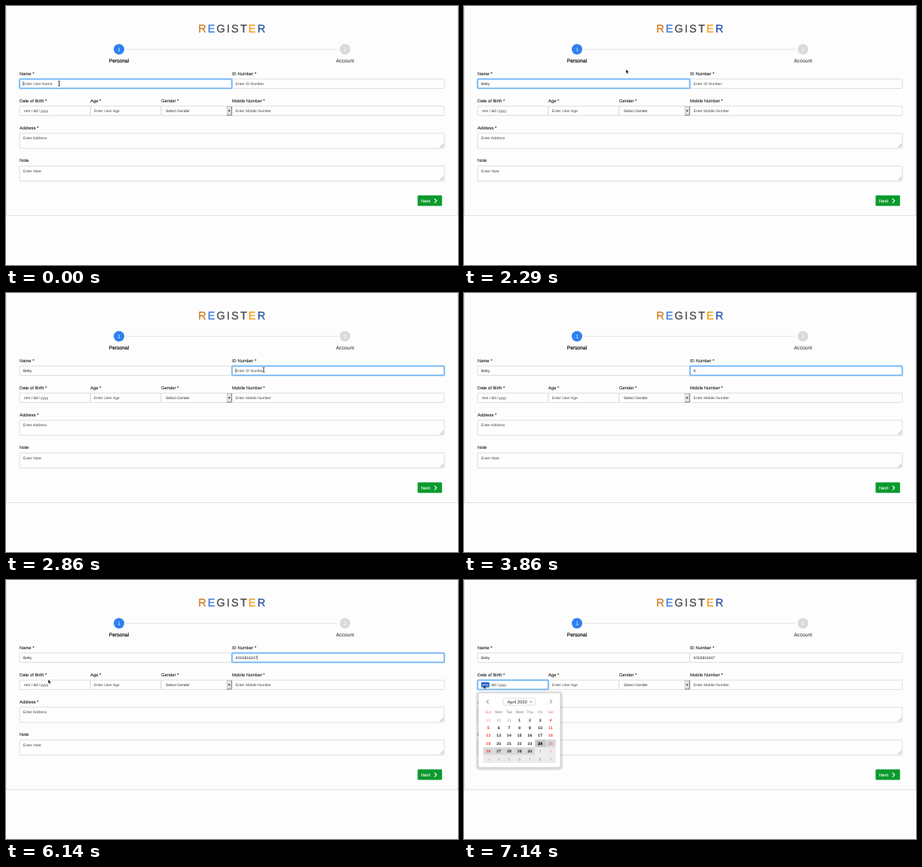
Write an HTML page that moves like this. It is 600 px wide and 344 px high and loops after 8 s.

```html
<!DOCTYPE html>
<html lang="en">
<head>
<meta charset="utf-8">
<title>Register form</title>
<style>
  html, body { margin: 0; width: 100%; height: 100%; overflow: hidden; background: #fefefe; }
  svg { display: block; width: 100vw; height: 100vh; font-family: "Liberation Sans", Arial, sans-serif; }
  text { white-space: pre; text-rendering: geometricPrecision; }
</style>
</head>
<body>
<svg id="stage" viewBox="0 0 600 344"></svg>
<script>
const LOOP = 8000, STEP = 1000 / 7;
const stage = document.getElementById('stage');

function add(tag, attrs, parent = stage) {
  const el = document.createElementNS('http://www.w3.org/2000/svg', tag);
  for (const k in attrs) el.setAttribute(k, attrs[k]);
  parent.appendChild(el);
  return el;
}
function text(str, x, y, size, fill, extra = {}, parent = stage) {
  const el = add('text', { x, y, 'font-size': size, fill, ...extra }, parent);
  el.textContent = str;
  return el;
}
function rect(x, y, width, height, fill, extra = {}, parent = stage) {
  return add('rect', { x, y, width, height, fill, ...extra }, parent);
}
function line(d, stroke, width, parent = stage) {
  return add('path', { d, stroke, 'stroke-width': width, fill: 'none' }, parent);
}
const show = (el, on) => el.setAttribute('opacity', +on);
const mid = { 'text-anchor': 'middle' };
const label = (str, x, y) => text(str, x, y, 5.85, '#222', { stroke: '#222', 'stroke-width': 0.1 });
const value = (str, x, y, fill = '#484848') => text(str, x, y, 5, fill);
const box = (x, y, w, h) => rect(x, y, w, h, '#fefefe', { stroke: '#cdcfd2', 'stroke-width': 0.7, rx: 1 });

// Page and heading
rect(0.5, -0.5, 599, 279, '#fdfdfd', { stroke: '#dedede', 'stroke-width': 0.9 });
const title = text('', 255.2, 35, 14.6, '#444', { 'letter-spacing': 2.05 });
const hues = ['#d17a1e', '#3a7fe0', '#4a4a4a', '#4a4a4a', '#4a4a4a', '#4a4a4a', '#f0a01e', '#2b55a8'];
[...'REGISTER'].forEach((c, i) => {
  add('tspan', { fill: hues[i], stroke: hues[i], 'stroke-width': 0.3 }, title).textContent = c;
});

// Step bar
line('M160 57.5H440', '#dcdcdc', 0.7);
[[150, '1', '#2f80f2', 'Personal', '#111', 0.2], [450, '2', '#dadada', 'Account', '#444', 0.08]]
  .forEach(([x, n, fill, name, ink, weight]) => {
    add('circle', { cx: x, cy: 57.5, r: 7, fill });
    text(n, x, 60, 6.6, '#fff', mid);
    text(name, x, 74.6, 6.7, ink, { ...mid, stroke: ink, 'stroke-width': weight });
  });

// Fields
label('Name *', 18, 91.6);
label('ID Number *', 300, 91.6);
label('Date of Birth *', 18, 127.6);
label('Age *', 112, 127.6);
label('Gender *', 206, 127.6);
label('Mobile Number *', 300, 127.6);
label('Address *', 18, 163.6);
label('Note', 18, 207);

const boxes = [[18, 97, 281.8, 12.4], [300, 97, 281.8, 12.4], [18, 133, 94, 12.4]];
boxes.forEach(b => box(...b));
box(112, 133, 94, 12.4);
box(206, 133, 94, 12.4);
box(300, 133, 281.8, 12.4);
value('Enter User Age', 116.8, 141);
value('Select Gender', 212, 141, '#333');
value('Enter Mobile Number', 304.8, 141);

rect(293.2, 133.4, 6.2, 11.6, '#e4e4e4', { stroke: '#aaa', 'stroke-width': 0.5 });
line('M293.2 145H299.4V133.4', '#666', 0.7);
add('path', { d: 'M294.8 138.5h3l-1.5 1.9z', fill: '#111' });

[[169, 'Enter Address'], [212.5, 'Enter Note']].forEach(([y, hint]) => {
  box(18, y, 563.8, 20);
  value(hint, 22.8, y + 8);
  line(`M576 ${y + 19}l5 -5M578.5 ${y + 19}l2.5 -2.5`, '#777', 0.6);
});

rect(546.4, 251.4, 32.4, 14, '#0b9a2d', { rx: 1.2 });
text('Next', 551, 260.6, 5.85, '#fff', { stroke: '#fff', 'stroke-width': 0.1 });
line('M568.8 256l2.8 2.8l-2.8 2.8', '#fff', 1.1);

// Focus rings
const rings = boxes.map(([x, y, w, h]) => {
  const g = add('g', {});
  rect(x, y, w, h, 'none', { stroke: '#a9d3fb', 'stroke-width': 2.4, rx: 1.4 }, g);
  rect(x, y, w, h, 'none', { stroke: '#62acee', 'stroke-width': 0.9, rx: 1 }, g);
  return g;
});

// Editable text, date parts and caret
const inputs = [
  { el: value('', 22.8, 105), hint: 'Enter User Name', full: 'Betty', x: 22.8 },
  { el: value('', 304.8, 105), hint: 'Enter ID Number', full: 'K502816347', x: 304.8 }
];
const picked = rect(22.9, 135.8, 10.6, 6.8, '#1c60cf');
const month = value('mm', 24, 141, '#333');
[['/', 33.8], ['dd', 36.6], ['/', 43.2], ['yyyy', 46]].forEach(([s, x]) => value(s, x, 141, '#333'));
const caret = rect(0, 100.2, 0.5, 6, '#222');

// Calendar
const cal = add('g', {});
for (let i = 4; i > 0; i--) {
  rect(19 - i, 151 - i, 109 + 2 * i, 98.5 + 2 * i, '#000', { opacity: 0.045, rx: 2 + i }, cal);
}
rect(19, 150, 109, 99, '#fff', { rx: 2, stroke: '#c4c4c4', 'stroke-width': 0.6 }, cal);
line('M32.6 159l-2.5 2.6l2.5 2.6M114.2 159l2.5 2.6l-2.5 2.6', '#444', 0.8, cal);
rect(52, 157, 43, 9.2, '#fff', { rx: 1, stroke: '#ccc', 'stroke-width': 0.6 }, cal);
text('April 2020', 57.5, 163.7, 5.8, '#222', {}, cal);
line('M87.2 160.8l1.8 1.8l1.8 -1.8', '#444', 0.7, cal);
const colX = c => 32.4 + 13.75 * c;
['Sun', 'Mon', 'Tue', 'Wed', 'Thu', 'Fri', 'Sat'].forEach((d, c) => {
  text(d, colX(c), 177, 5, c % 6 ? '#777' : '#f27878', mid, cal);
});
for (let i = 0; i < 42; i++) {
  const c = i % 7, r = (i - c) / 7, day = i - 2;
  const inside = day > 0 && day <= 30, weekend = c % 6 === 0;
  const x = colX(c), y = 185.7 + 10.42 * r;
  if (day >= 24) {
    const fill = day === 24 ? '#c9c9c9' : inside ? '#d8d8d8' : '#ececec';
    rect(x - 6.9, y - 5.2, 13.8, 10.45, fill, {}, cal);
  }
  const ink = inside ? (weekend ? '#f03c3c' : '#222') : (weekend ? '#f49a9a' : '#999');
  const shown = day < 1 ? day + 31 : day > 30 ? day - 30 : day;
  const bold = inside && day !== 25 ? { stroke: ink, 'stroke-width': day === 24 ? 0.4 : 0.18 } : {};
  text(shown, x, y + 1.8, 5, ink, { ...mid, ...bold }, cal);
}

// Pointers
const beam = add('g', {});
const beamPath = 'M-1.5 -3.2Q0 -3.2 0 -2.4Q0 -3.2 1.5 -3.2M0 -2.4V2.4M-1.5 3.2Q0 3.2 0 2.4Q0 3.2 1.5 3.2';
line(beamPath, '#fff', 1.5, beam);
line(beamPath, '#111', 0.8, beam);
const arrow = add('path', {
  d: 'M0 0V5.6L1.3 4.4L2.2 6.5L3.2 6.1L2.3 4H4z',
  fill: '#111', stroke: '#fff', 'stroke-width': 0.4
});

// [step, x, y]
const pathTo = [
  [0, 70.5, 103], [12, 70.5, 103], [14, 108, 92], [16, 215, 84], [18, 338, 98], [19, 342, 102],
  [38, 342, 102], [40, 262, 113], [42, 90, 128], [43, 56, 132], [46, 26, 139], [56, 26, 139]
];
function pointerAt(s) {
  const i = pathTo.findIndex(k => k[0] > s);
  const [a, b] = [pathTo[i - 1], pathTo[i]];
  const u = (s - a[0]) / (b[0] - a[0]);
  return [a[1] + (b[1] - a[1]) * u, a[2] + (b[2] - a[2]) * u];
}
const keys = [[5, 7, 9, 10, 11], [27, 31, 32, 32, 33, 34, 34, 35, 35, 36]];
const ramp = (s, start) => Math.max(0, Math.min(1, (s - start + 1) / 2));
const within = (s, a, b) => s >= a && s < b;

function draw(ms) {
  // The screen refreshes seven times a second
  const s = Math.floor((ms + 5) / STEP);

  inputs.forEach((f, i) => {
    const n = keys[i].filter(k => k <= s).length;
    f.el.textContent = n ? f.full.slice(0, n) : f.hint;
    f.el.setAttribute('fill', n ? '#222' : '#484848');
    f.end = n ? f.el.getComputedTextLength() + 0.2 : -0.2;
  });

  const toId = ramp(s, 19), toDate = ramp(s, 48);
  show(rings[0], 1 - toId);
  show(rings[1], toId * (1 - toDate));
  show(rings[2], toDate);

  const f = inputs[s < 19 ? 0 : 1];
  caret.setAttribute('x', f.x + f.end);
  show(caret, s < 2 || s === 6 || s === 8 || within(s, 19, 22) || within(s, 29, 39) || within(s, 43, 47));

  show(picked, s >= 48);
  month.setAttribute('fill', s >= 48 ? '#fff' : '#333');
  show(cal, s < 49 ? 0 : s === 49 ? 0.5 : 1);

  const [x, y] = pointerAt(s);
  const visible = !within(s, 5, 13) && !within(s, 27, 40);
  const overText = y > 97 && y < 110;
  for (const p of [beam, arrow]) p.setAttribute('transform', `translate(${x} ${y})`);
  show(beam, visible && overText);
  show(arrow, visible && !overText);
}

const began = performance.now();
function tick() {
  draw((performance.now() - began) % LOOP);
  requestAnimationFrame(tick);
}
tick();
</script>
</body>
</html>
```
